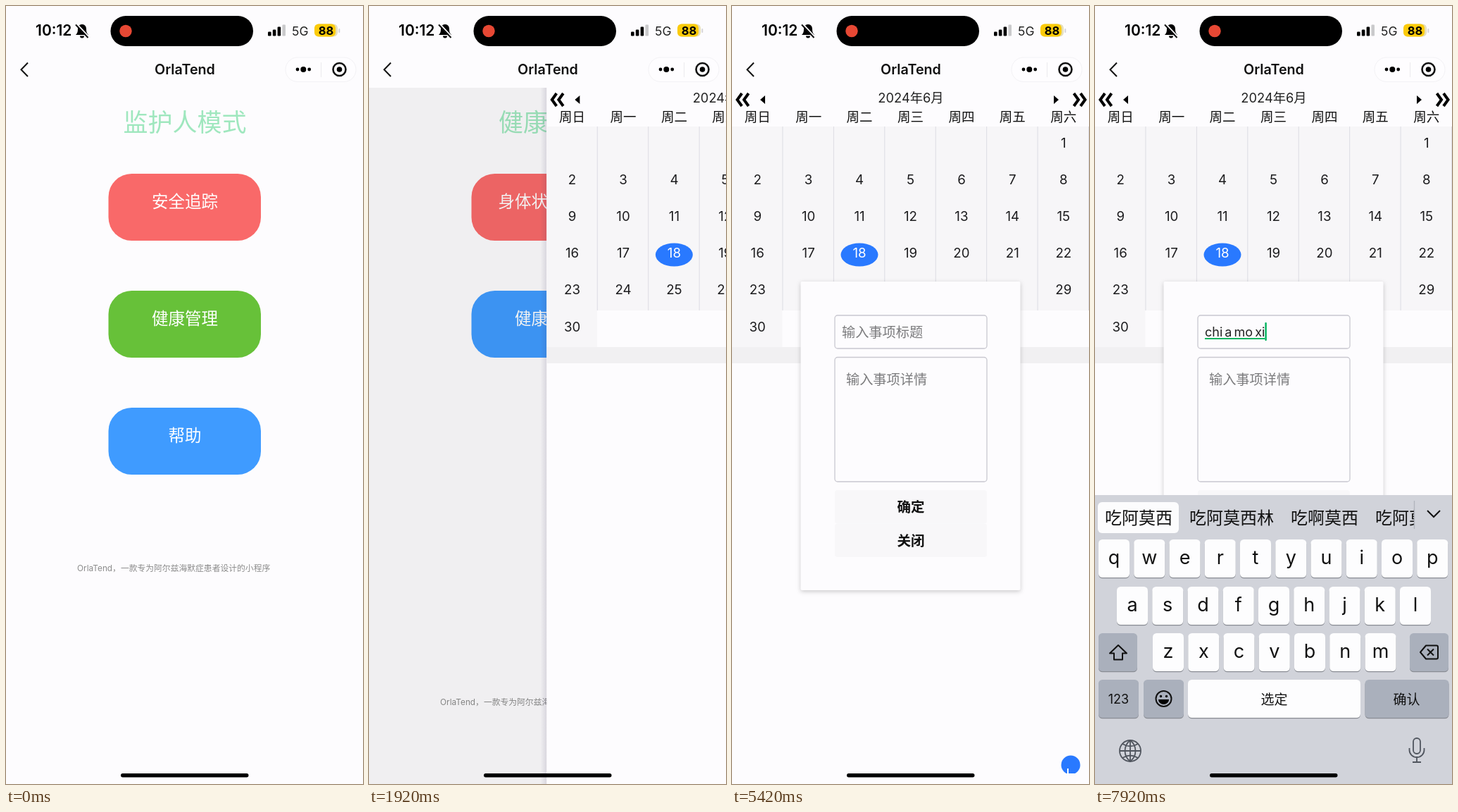
Recreate the animation shown at these times as an HTML page. Size 507 px wide and 1104 px high, loop 8000 ms.

```html
<!DOCTYPE html>
<html lang="zh-CN">
<head>
<meta charset="utf-8">
<style>
html, body { margin: 0; width: 100%; height: 100%; overflow: hidden; background: #fdfcfe; }
svg { display: block; width: 507px; height: 1104px; font-family: Inter, "Noto Sans CJK SC", "Noto Sans CJK", sans-serif; }
.line { fill: none; stroke: #111; stroke-width: 2; }
</style>
</head>
<body>
<svg id="stage" viewBox="0 0 507 1104"></svg>
<script>
const BG = '#fdfcfe', BLUE = '#2979ff', GREEN = '#07b561', GREY = '#aab0bc';
const APP = 'OrlaTend';

const rect = (x, y, w, h, r, fill, more = '') =>
  `<rect x="${x}" y="${y}" width="${w}" height="${h}" rx="${r}" fill="${fill}" ${more}/>`;
const text = (x, y, size, str, more = '') =>
  `<text x="${x}" y="${y}" font-size="${size}" ${more}>${str}</text>`;
const mid = (x, y, size, str, more = '') => text(x, y, size, str, 'text-anchor="middle" ' + more);
const circle = (x, y, r, more = '') => `<circle cx="${x}" cy="${y}" r="${r}" ${more}/>`;
const line = (d, more = '') => `<path class="line" d="${d}" ${more}/>`;
const each = (list, fn) => [...list].map(fn).join('');

const page = (id, body) => `<g id="${id}">
  ${rect(-9, 116, 9, 988, 0, 'url(#edge)')}${rect(0, 116, 507, 988, 0, BG)}${body}</g>`;
const dim = id => rect(0, 116, 507, 988, 0, '#000', `id="${id}" opacity="0"`);

function menu(title, items, noteY) {
  return mid(254, 178, 35, title, 'fill="#9fe7be"') +
    each(items, ([label, color], i) => {
      const y = 238 + 166 * i;
      return rect(145.5, y, 216.5, 95, 33, color) +
        mid(254, y + 48, 23.5, label, 'fill="#fff" font-weight="500"');
    }) +
    text(101, noteY, 11.8, APP + '，一款专为阿尔兹海默症患者设计的小程序', 'fill="#8b8b8b"');
}

function calendar() {
  const col = 507 / 7, row = 52.1;
  let out = rect(0, 171, 507, 261, 0, '#f7f6f8') + rect(0, 431, 71.5, 53, 0, '#f7f6f8') +
    rect(0, 484, 507, 23, 0, '#f1f0f2') +
    mid(254, 136.5, 18.3, '2024年6月', 'fill="#222"');
  const twin = line('M14 124l-6.500 9 6.500 9M23.500 124l-6.500 9 6.500 9', 'style="stroke:#000;stroke-width:4"');
  out += twin + `<g transform="translate(509 0) scale(-1 1)">${twin}</g>` +
    '<path d="M47 127v12l-7-6zM457 127v12l7-6z"/>';
  out += each('日一二三四五六', (d, i) =>
    mid(col * (i + .5), 164, 18.5, '周' + d, 'fill="#111"') +
    rect(col * (i + 1) - 1, 171, 1, 261, 0, '#dddce4'));
  out += `<ellipse cx="181" cy="353" rx="26.500" ry="16.500" fill="${BLUE}"/>`;
  for (let d = 1; d <= 30; d++) {
    const n = d + 5;
    out += mid(col * (n % 7 + .5), 201 + row * Math.floor(n / 7), 18.7, d,
      `fill="${d === 18 ? '#fff' : '#1c1c1e'}"`);
  }
  return out + circle(481, 1077, 13.5, `fill="${BLUE}"`) +
    rect(470, 1090, 22, 2, 0, BG) +
    line('M477 1082v9M474 1090h14', 'style="stroke:#fff"');
}

function dialog() {
  const box = (y, h) => rect(146, y, 216, h, 4, 'none', 'stroke="#c9c8d0" stroke-width="1.3"');
  const hint = (x, y, s, id) => text(x, y, 19.2, s, `fill="#7b7b7d" id="${id}"`);
  const button = (y, s) => rect(146, y, 216, 47.500, 4, '#f8f7f9') +
    mid(254, y + 31, 19.5, s, 'font-weight="600" fill="#111"');
  return `<g id="dialog">${rect(97.5, 391, 312, 438, 2, BG, 'style="filter:drop-shadow(0 2px 3px #0003)"')}
    ${box(439, 47)}${box(498.5, 176.5)}
    ${hint(156, 469.5, '输入事项标题', 'hint')}${hint(162, 536.5, '输入事项详情', 'hint2')}
    ${button(687, '确定')}${button(734.5, '关闭')}
    ${text(156, 469, 18, '', 'id="typed" fill="#222" word-spacing="-2"')}
    ${rect(156, 471, 0, 2, 0, GREEN, 'id="under"')}
    ${rect(156, 449, 2.5, 26, 1, GREEN, 'id="caret"')}</g>`;
}

function keyboard() {
  const key = (x, y, w, fill = '#fdfdfe', id = '') =>
    rect(x, y + 1.3, w, 54, 5.5, '#898c93') + rect(x, y, w, 54, 5.5, fill, id);
  const letters = (s, x, y) => each(s, (c, i) =>
    key(x + 50.25 * i, y, 44) + mid(x + 50.25 * i + 22, y + 34.5, 27, c, 'fill="#111"'));
  return `<g id="keyboard">${rect(0, 694, 507, 410, 0, '#d1d3da')}
    ${rect(4, 704, 115, 44, 6, '#fcfcfd', 'id="pick"')}
    <g id="words" clip-path="url(#bar)"></g>
    ${line('M453.500 702v40', 'style="stroke:#b1b4bc;stroke-width:1.3"')}${line('M472 716l9 9 9-9')}
    ${letters('qwertyuiop', 5, 757)}${letters('asdfghjkl', 31, 824)}${letters('zxcvbnm', 82, 890)}
    ${key(5, 890, 55, GREY)}${line('M33 907l-12 11.500h6v9h12v-9h6z', 'stroke-linejoin="round"')}
    ${key(447, 890, 55, GREY)}${line('M462 917l8-9.500h15a2 2 0 0 1 2 2v15a2 2 0 0 1-2 2h-15zM472 912.500l9 9M481 912.500l-9 9', 'stroke-linejoin="round"')}
    ${key(5, 956, 57, GREY)}${mid(33.5, 990, 18, '123', 'fill="#111"')}
    ${key(69, 956, 57, GREY)}${circle(97.5, 983, 11, 'class="line"')}
    ${circle(93.5, 979.5, 1.7)}${circle(101.5, 979.5, 1.7)}<path d="M90 984h15a7.500 7 0 0 1-15 0z"/>
    ${key(132, 956, 245)}${mid(254.5, 991, 19, '', 'id="space" fill="#111"')}
    ${key(383.5, 956, 119, '#007aff', 'id="enter"')}${mid(442.5, 991, 19, '', 'id="enterText"')}
    <g style="--c:#50555e">${circle(50, 1057, 15, 'class="line" style="stroke:var(--c);stroke-width:1.800"')}
    ${line('M50 1042v30M35 1057h30M39 1047q11 7 22 0M39 1067q11-7 22 0M50 1042c-10 8-10 22 0 30c10-8 10-22 0-30', 'style="stroke:var(--c);stroke-width:1.800"')}
    ${rect(452, 1039, 10, 22, 5, 'none', 'style="stroke:var(--c);stroke-width:1.800"')}
    ${line('M446.500 1053v3a10.500 10 0 0 0 21 0v-3M457 1066v7M451 1073h12', 'style="stroke:var(--c);stroke-width:1.800"')}</g></g>`;
}

function chrome() {
  const bell = 'M108 26c-4 0-6 3-6 7 0 4-1 6-3 8h18c-2-2-3-4-3-8 0-4-2-7-6-7zM105 42.500h6a3 3 0 0 1-6 0z';
  return rect(0, 0, 507, 116, 0, BG) +
    text(42, 42, 21, '10:12', 'font-weight="600"') + `<path d="${bell}"/>` +
    line('M101 26l17 18', `style="stroke:${BG}"`) + line('M99 26.500l17.500 18.500') +
    rect(148.5, 14, 202.5, 43, 21.5, '#000') + circle(170, 35.5, 8.7, 'fill="#e74834"') +
    each([6, 9, 13, 16], (h, i) => rect(372 + 6.8 * i, 42.500 - h, 4.6, h, 1.3, i < 3 ? '#000' : '#cacacc')) +
    text(406, 42, 17.5, '5G', 'fill="#222"') +
    rect(438, 25.5, 33, 18, 6, '#e6dfb9') + rect(438, 25.5, 30, 18, 6, '#fccb0a') +
    rect(472.3, 32, 2, 6, 1, '#d5d4d8') + mid(454.5, 40.5, 16.5, '88', 'font-weight="700"') +
    line('M31 80.500l-9.500 9.700 9.500 9.800') +
    mid(254, 97, 19.7, APP, 'font-weight="600" fill="#111"') +
    rect(397, 73, 100, 34.5, 17, '#fefdff', 'stroke="#f3f2f5"') + rect(447, 80, 1, 21, 0, '#ebeaee') +
    circle(414, 90, 2.4) + circle(422.3, 90, 4) + circle(430.7, 90, 2.4) +
    circle(473.5, 90, 9, 'class="line" style="stroke-width:2.600"') + circle(473.5, 90, 3.8);
}

const RED = '#f96969', AZURE = '#3f9bff';
const stage = document.getElementById('stage');
stage.innerHTML = `<defs>
  <linearGradient id="edge"><stop stop-color="#3a3060" stop-opacity="0"/><stop offset="1" stop-color="#3a3060" stop-opacity=".13"/></linearGradient>
  <clipPath id="bar"><rect y="694" width="453" height="60"/></clipPath></defs>` +
  page('home', menu('监护人模式', [['安全追踪', RED], ['健康管理', '#67c139'], ['帮助', AZURE]], 802)) + dim('dim1') +
  page('health', menu('健康管理', [['身体状况查询', RED], ['健康提醒', AZURE]], 991.5)) + dim('dim2') +
  page('calendar', calendar() + dialog()) + chrome() + keyboard() +
  rect(163, 1089, 181.5, 5.5, 2.7, '#000');

const $ = id => document.getElementById(id);
const set = (id, attrs) => { for (const k in attrs) $(id).setAttribute(k, attrs[k]); };
const show = (id, on) => set(id, { visibility: on ? 'visible' : 'hidden' });
const ease = (t, start, span) => 1 - (1 - Math.min(1, Math.max(0, (t - start) / span))) ** 3;

// Typed pinyin and the suggestions that go with it
const steps = [
  ['', '我 你 他 不 那 这 好 但 不是'],
  ['c', '才 从 吃 次 出 曾 错 此 除了'],
  ['ch', '吃 出 成 车 穿 长 除 超 除了'],
  ['chi', '吃 持 迟 尺 池 赤 翅 齿 吃饭'],
  ['chi a', '吃啊 吃 持 迟 尺 池 赤 翅'],
  ['chi a m', '吃阿莫 吃啊 吃 持 迟 尺 池'],
  ['chi a mo', '吃阿莫 吃啊莫 吃啊 吃 持 迟'],
  ['chi a mo x', '吃阿莫西 吃阿莫西林 吃阿莫 吃啊'],
  ['chi a mo xi', '吃阿莫西 吃阿莫西林 吃啊莫西 吃阿莫喜']
];
let shown = -1;

function type(n) {
  if (n === shown) return;
  shown = n;
  const [input, words] = steps[n];
  let x = 14;
  $('words').innerHTML = each(words.split(' '), w => {
    const item = text(x, 735, 24, w, 'fill="#111"');
    x += 24 * (w.length + 1);
    return item;
  });
  $('typed').textContent = input;
  const width = input ? $('typed').getComputedTextLength() : 0;
  set('under', { width });
  set('caret', { x: 156 + width });
  set('pick', { width: 24 * words.split(' ')[0].length + 19 });
  $('space').textContent = n ? '选定' : '空格';
  $('enterText').textContent = n ? '确认' : '完成';
  set('enter', { fill: n ? GREY : '#007aff' });
  set('enterText', { fill: n ? '#111' : '#fff' });
}

function slide(id, shade, p) {
  set(id, { transform: `translate(${p ? 507 * (1 - p) : 600} 0)` });
  set(shade, { opacity: .1 * p });
}

function draw(now) {
  const t = now % 8000;
  slide('health', 'dim1', ease(t, 270, 400));
  slide('calendar', 'dim2', ease(t, 1838, 400));
  set('keyboard', { transform: `translate(0 ${410 * (1 - ease(t, 5480, 350))})` });
  const n = Math.max(0, Math.min(8, Math.floor((t - 6700) / 130)));
  type(n);
  show('dialog', t >= 4400);
  show('hint', t >= 4400 && !n);
  show('caret', t >= 5480);
  show('pick', n > 0);
  requestAnimationFrame(draw);
}
draw(performance.now());
</script>
</body>
</html>
```
